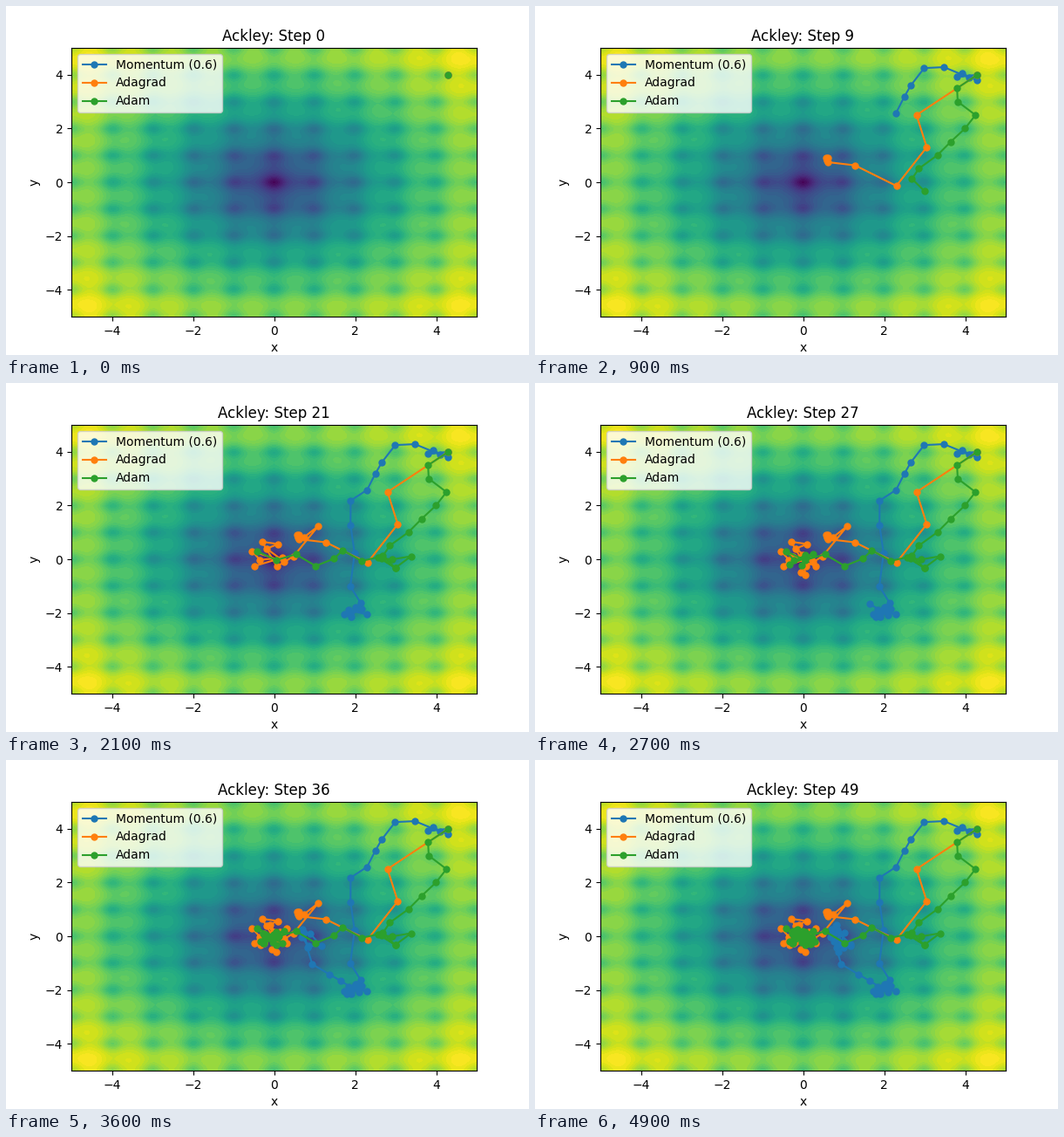
Animation, 600 px wide and 400 px high, one loop 5 s. Source, as a matplotlib script:

```python
import numpy as np
import matplotlib.pyplot as plt
from matplotlib.animation import FuncAnimation

STEPS = 50
INTERVAL = 100
START = (4.3, 4.0)


def ackley(x, y):
    bowl = -20 * np.exp(-0.2 * np.sqrt(0.5 * (x**2 + y**2)))
    ripple = -np.exp(0.5 * (np.cos(2 * np.pi * x) + np.cos(2 * np.pi * y)))
    return bowl + ripple + np.e + 20


def gradient(p):
    r = np.sqrt(0.5 * np.sum(p**2))
    bowl = 2 * np.exp(-0.2 * r) * p / (r + 1e-12)
    ripple = np.pi * np.sin(2 * np.pi * p) * np.exp(0.5 * np.sum(np.cos(2 * np.pi * p)))
    return bowl + ripple


def momentum(lr=0.1, beta=0.6):
    velocity = np.zeros(2)

    def step(g, t):
        nonlocal velocity
        velocity = beta * velocity + lr * g
        return velocity

    return step


def adagrad(lr=1.5, eps=1e-8):
    total = np.zeros(2)

    def step(g, t):
        nonlocal total
        total = total + g**2
        return lr * g / (np.sqrt(total) + eps)

    return step


def adam(lr=0.5, beta1=0.2, beta2=0.2, eps=1e-8):
    m, v = np.zeros(2), np.zeros(2)

    def step(g, t):
        nonlocal m, v
        m = beta1 * m + (1 - beta1) * g
        v = beta2 * v + (1 - beta2) * g**2
        m_hat = m / (1 - beta1**t)
        v_hat = v / (1 - beta2**t)
        return lr * m_hat / (np.sqrt(v_hat) + eps)

    return step


def descend(step):
    path = [np.array(START)]
    for t in range(1, STEPS):
        p = path[-1]
        path.append(p - step(gradient(p), t))
    return np.array(path)


paths = {
    "Momentum (0.6)": descend(momentum()),
    "Adagrad": descend(adagrad()),
    "Adam": descend(adam()),
}

fig, ax = plt.subplots(figsize=(6, 4), dpi=100)
axis = np.linspace(-5, 5, 200)
X, Y = np.meshgrid(axis, axis)
ax.contourf(X, Y, ackley(X, Y), levels=50, cmap="viridis")
ax.set(xlim=(-5, 5), ylim=(-5, 5), xlabel="x", ylabel="y")
title = ax.set_title("Ackley: Step 0")
lines = [ax.plot([], [], "o-", markersize=5, label=name)[0] for name in paths]
ax.legend(loc="upper left")


def update(frame):
    for line, path in zip(lines, paths.values()):
        line.set_data(path[:frame + 1, 0], path[:frame + 1, 1])
    title.set_text(f"Ackley: Step {frame}")
    return [*lines, title]


anim = FuncAnimation(fig, update, frames=STEPS, interval=INTERVAL, repeat=True, repeat_delay=0)
plt.show()
```
